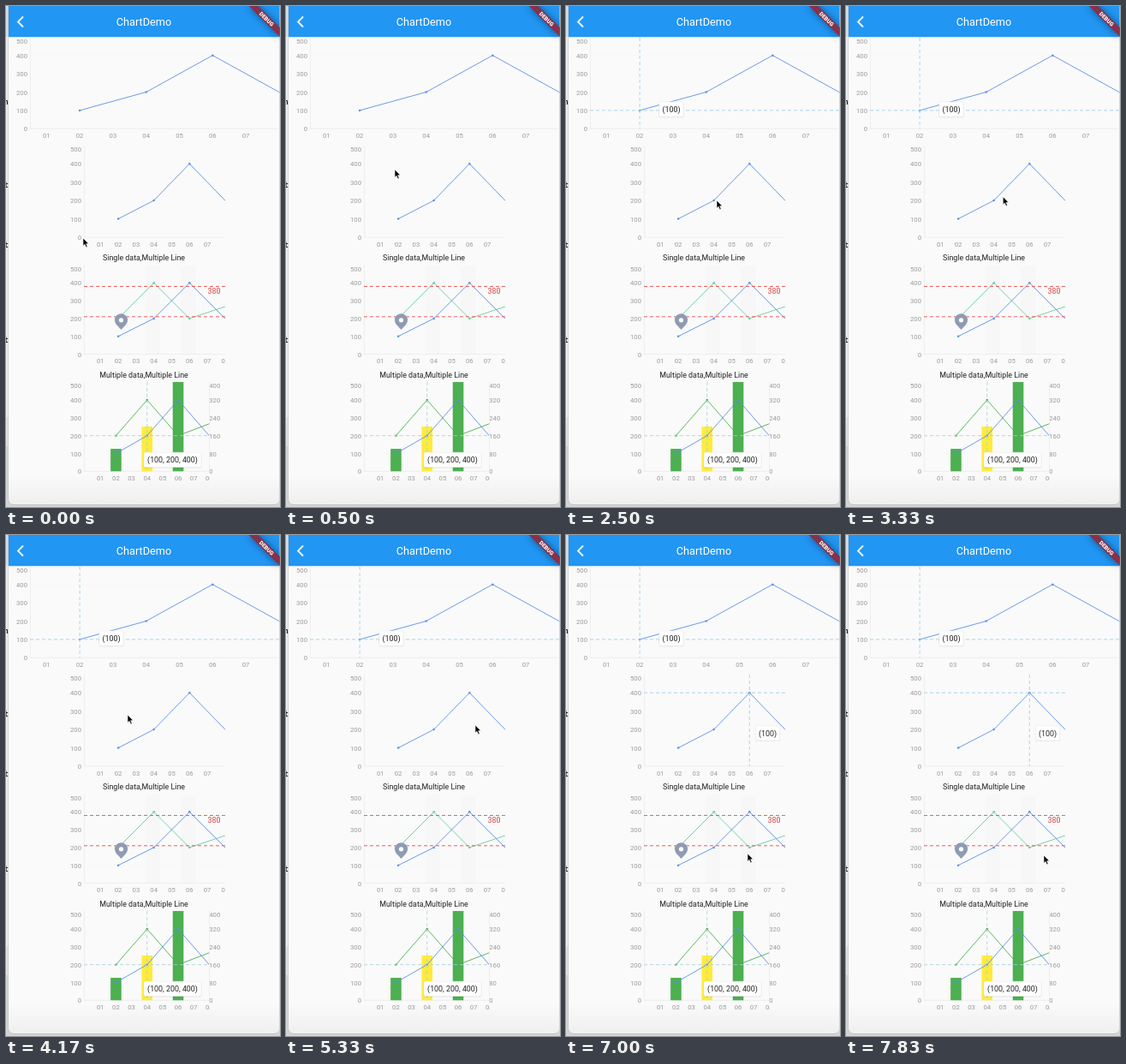
Animation, 320 px wide and 585 px high, one loop 8 s. Source, as an HTML page:

```html
<!DOCTYPE html>
<html lang="en">
<head>
<meta charset="utf-8">
<title>ChartDemo</title>
<style>
  html, body { margin: 0; width: 100%; height: 100%; overflow: hidden; background: #d4d6d5; }
  svg { display: block; width: 320px; height: 585px; font-family: Roboto, "Open Sans", sans-serif; }
  .ribbon { filter: drop-shadow(0 0 4px rgba(0, 0, 0, .5)); }
</style>
</head>
<body>
<svg id="stage" viewBox="0 0 320 585"></svg>
<script>
const NS = 'http://www.w3.org/2000/svg';
const stage = document.getElementById('stage');
const BLUE = '#5b90e8', GREEN = '#4caf50', TEAL = '#62d09e', GRID = '#ebebeb', CROSS = '#93cdea', RED = '#e25050';

function add(parent, tag, attrs = {}, content) {
  const node = document.createElementNS(NS, tag);
  for (const key in attrs) node.setAttribute(key, attrs[key]);
  if (content !== undefined) node.textContent = content;
  parent.appendChild(node);
  return node;
}

// Text vertically centred on y by its cap height.
const label = (parent, x, y, text, size = 7.7, fill = '#9a9a9a', anchor = 'middle') =>
  add(parent, 'text', { x, y: y + size * 0.355, 'font-size': size, fill, 'text-anchor': anchor }, text);

const line = (parent, x1, y1, x2, y2, stroke, dash = 'none', width = 0.8) =>
  add(parent, 'line', { x1, y1, x2, y2, stroke, 'stroke-width': width, 'stroke-dasharray': dash });

const rect = (parent, x, y, width, height, fill, more = {}) =>
  add(parent, 'rect', { x, y, width, height, fill, ...more });

const show = (node, on) => node.setAttribute('visibility', on ? 'visible' : 'hidden');

function makeChart(c) {
  c.px = month => c.first + (month - 1) * c.step;
  c.py = value => c.base - value / 100 * c.unit;
  c.labelY = i => i === 5 ? c.top + 4 : c.py(i * 100) + 0.3;
  const clip = add(stage, 'clipPath', { id: c.id });
  rect(clip, c.x0, c.top - 1, c.x1 - c.x0, c.base - c.top + 16, '#000');

  for (let i = 0; i <= 5; i++) {
    label(stage, c.x0 - 3, c.labelY(i), i * 100, 7.7, '#9a9a9a', 'end');
    if (i && i < 5) line(stage, c.x0, c.py(i * 100), c.x1, c.py(i * 100), '#f6f6f6', 'none', 0.5);
  }
  line(stage, c.x0 + 0.5, c.top, c.x0 + 0.5, c.base, GRID);
  line(stage, c.x0, c.base, c.x1, c.base, GRID);
  c.frame = add(stage, 'g', { 'clip-path': `url(#${c.id})` });
  c.plot = add(c.frame, 'g');
  for (let m = 1; m <= c.months; m++) label(c.plot, c.px(m), c.base + 8, String(m).padStart(2, '0'));
  return c;
}

function series(c, color, values) {
  const points = [2, 4, 6, 9].map((m, i) => [c.px(m), c.py(values[i])]);
  add(c.plot, 'polyline', { points: points.join(' '), fill: 'none', stroke: color, 'stroke-width': 0.9 });
  for (const [cx, cy] of points) add(c.plot, 'circle', { cx, cy, r: 1.25, fill: color });
}

function tooltip(parent, x, y, width, text) {
  rect(parent, x - 0.6, y + 0.2, width + 1.2, 18.2, '#000', { rx: 2.5, opacity: 0.07 });
  rect(parent, x, y, width, 17.2, '#fff', { rx: 2, stroke: '#ececec', 'stroke-width': 0.6 });
  label(parent, x + width / 2, y + 8.7, text, 8.87, '#222');
}

function crosshair(c, month, value, tip, color = CROSS) {
  const g = add(stage, 'g');
  line(g, c.x0, c.py(value), c.x1, c.py(value), color, '4 3');
  line(g, c.px(month), c.top, c.px(month), c.base, color, '4 3');
  if (tip) tooltip(g, ...tip);
  return g;
}

// Window behind the phone and the phone page
const shade = add(stage, 'linearGradient', { id: 'shade', x1: 0, y1: 0, x2: 0, y2: 1 });
add(shade, 'stop', { offset: 0.94, 'stop-color': '#fafafa' });
add(shade, 'stop', { offset: 1, 'stop-color': '#efefef' });
rect(stage, 0, 0, 320, 585, '#d4d6d5');
rect(stage, 0, 0, 3, 480, '#eeeeee');
rect(stage, 0, 0, 3, 36, '#d8dadb');
rect(stage, 0, 480, 3, 34, '#e2e2e2');
for (const [y, ch] of [[112, 'n'], [209, 't'], [279, 't'], [390, 't']])
  add(stage, 'text', { x: 3, y: y + 3, 'font-size': 9, 'font-weight': 700, 'text-anchor': 'end',
    'font-family': '"DejaVu Sans Mono", monospace', fill: '#222' }, ch);
rect(stage, 2.4, -10, 317.2, 593, '#bfc2c2', { rx: 7 });
rect(stage, 3, -10, 316.3, 592, 'url(#shade)', { rx: 6 });
rect(stage, 3, 0, 316.5, 36.3, '#2196f3');
rect(stage, 3, 36.3, 316.5, 1, '#dfe5ea');

// Header
add(stage, 'path', { d: 'M20 12.5L14 18.5L20 24.5', fill: 'none', stroke: '#fff', 'stroke-width': 1.8 });
label(stage, 161, 18.6, 'ChartDemo', 12.7, '#fff');
add(stage, 'path', { class: 'ribbon', d: 'M283.7 0H294.5L319.8 25.3V36.1Z', fill: '#87314a' });
const debug = label(stage, 0, 0, 'DEBUG', 6.5, '#fff');
debug.setAttribute('transform', 'translate(304.3 15.2) rotate(45)');
debug.setAttribute('font-weight', 900);

// Wide and narrow single line charts
const wide = makeChart({ id: 'wide', x0: 28, x1: 319.5, top: 37, base: 143.3, unit: 21.4, first: 47.3, step: 38.8, months: 7 });
const narrow = makeChart({ id: 'narrow', x0: 91, x1: 256, top: 163, base: 270, unit: 21.45, first: 110.3, step: 20.8, months: 7 });
for (const c of [wide, narrow]) series(c, BLUE, [100, 200, 400, 100]);
const wideFirst = crosshair(wide, 4, 200, [166.5, 106.8, 29, '(100)']);
const wideSecond = crosshair(wide, 2, 100, [109, 112, 28, '(100)']);
const narrowCross = crosshair(narrow, 6, 400, [221.5, 222.7, 28, '(100)']);

// Scrollable chart with limits and a pin
label(stage, 161, 294.3, 'Single data,Multiple Line', 8.87, '#222');
rect(stage, 163, 304, 17, 102, '#f7f7f7');
rect(stage, 204, 304, 18, 102, '#f7f7f7');
const scroller = makeChart({ id: 'scroller', x0: 91, x1: 256, top: 303, base: 406.5, unit: 20.8, first: 110.3, step: 20.8, months: 14 });
series(scroller, TEAL, [200, 400, 200, 300]);
series(scroller, BLUE, [100, 200, 400, 100]);
for (const limit of [380, 210]) line(stage, 91, scroller.py(limit), 256, scroller.py(limit), RED, '4 3', 0.9);
label(stage, 243, 333, '380', 8.87, '#dc4040');
const pinClip = add(stage, 'g', { 'clip-path': 'url(#scroller)' });
const pin = add(pinClip, 'g');
add(pin, 'path', { d: 'M134.5 378L128.7 371.7A7.6 7.6 0 1 1 140.3 371.7Z', fill: '#8f9bb1' });
add(pin, 'circle', { cx: 134.5, cy: 366.8, r: 2.6, fill: '#fff' });

// Bars with lines
label(stage, 161, 431, 'Multiple data,Multiple Line', 8.87, '#222');
const mixed = makeChart({ id: 'mixed', x0: 91, x1: 238, top: 439, base: 543.3, unit: 20.8, first: 110.3, step: 18.15, months: 8 });
for (let i = 0; i <= 5; i++) label(stage, 237.3, mixed.labelY(i), i * 80, 7.7, '#9a9a9a', 'start');
line(stage, 237.5, 439, 237.5, 543.3, GRID);
for (const [month, value, color] of [[2, 126, GREEN], [4, 251, '#ffeb3b'], [6, 501, GREEN]])
  rect(mixed.plot, mixed.px(month) - 6.3, mixed.py(value), 12.6, mixed.base - mixed.py(value), color);
series(mixed, GREEN, [200, 400, 200, 300]);
series(mixed, BLUE, [100, 200, 400, 100]);
crosshair(mixed, 4, 200, [161, 521.3, 67, '(100, 200, 400)'], '#a6cddb');

const pointer = add(stage, 'path', {
  d: 'M0 0V10.8L2.4 8.6L4.3 12.6L6.1 11.8L4.3 7.9L7.6 7.7Z',
  fill: '#000', stroke: '#fff', 'stroke-width': 0.7, 'stroke-linejoin': 'round'
});

// Pointer path: [tick, x, y], six ticks per second
const path = [
  [0, 90, 271], [1, 94, 262], [5, 160, 120], [7, 166, 106], [8, 164, 106], [11, 109, 112], [12, 112, 120],
  [15, 176, 227], [18, 140, 224], [21, 205, 222], [22, 228, 221], [25, 142, 210], [28, 112, 228],
  [29, 98, 235], [30, 130, 229], [32, 221, 222], [34, 221, 222], [35, 214, 345], [37, 79, 353],
  [38, 79, 354], [41, 165, 366], [42, 212, 372], [45, 238, 373], [46, 238, 373], [47, 231, 374]
];

function pointerAt(tick) {
  const next = path.findIndex(p => p[0] >= tick);
  if (next < 1) return path[0].slice(1);
  const [t0, x0, y0] = path[next - 1], [t1, x1, y1] = path[next];
  const k = (tick - t0) / (t1 - t0);
  return [x0 + (x1 - x0) * k, y0 + (y1 - y0) * k];
}

function render(ms) {
  const tick = Math.floor(ms * 0.006 + 0.03) % 48;
  const [x, y] = pointerAt(tick);
  pointer.setAttribute('transform', `translate(${x} ${y}) scale(.85)`);
  show(wideFirst, tick >= 7 && tick < 11);
  show(wideSecond, tick >= 11);
  show(narrowCross, tick >= 34);
  const scroll = tick >= 35 && tick < 42 ? Math.max(0, 214 - x) : 0;
  for (const g of [scroller.plot, pin]) g.setAttribute('transform', `translate(${-scroll} 0)`);
}

const start = performance.now();
function loop() {
  render((performance.now() - start) % 8000);
  requestAnimationFrame(loop);
}
loop();
</script>
</body>
</html>
```
